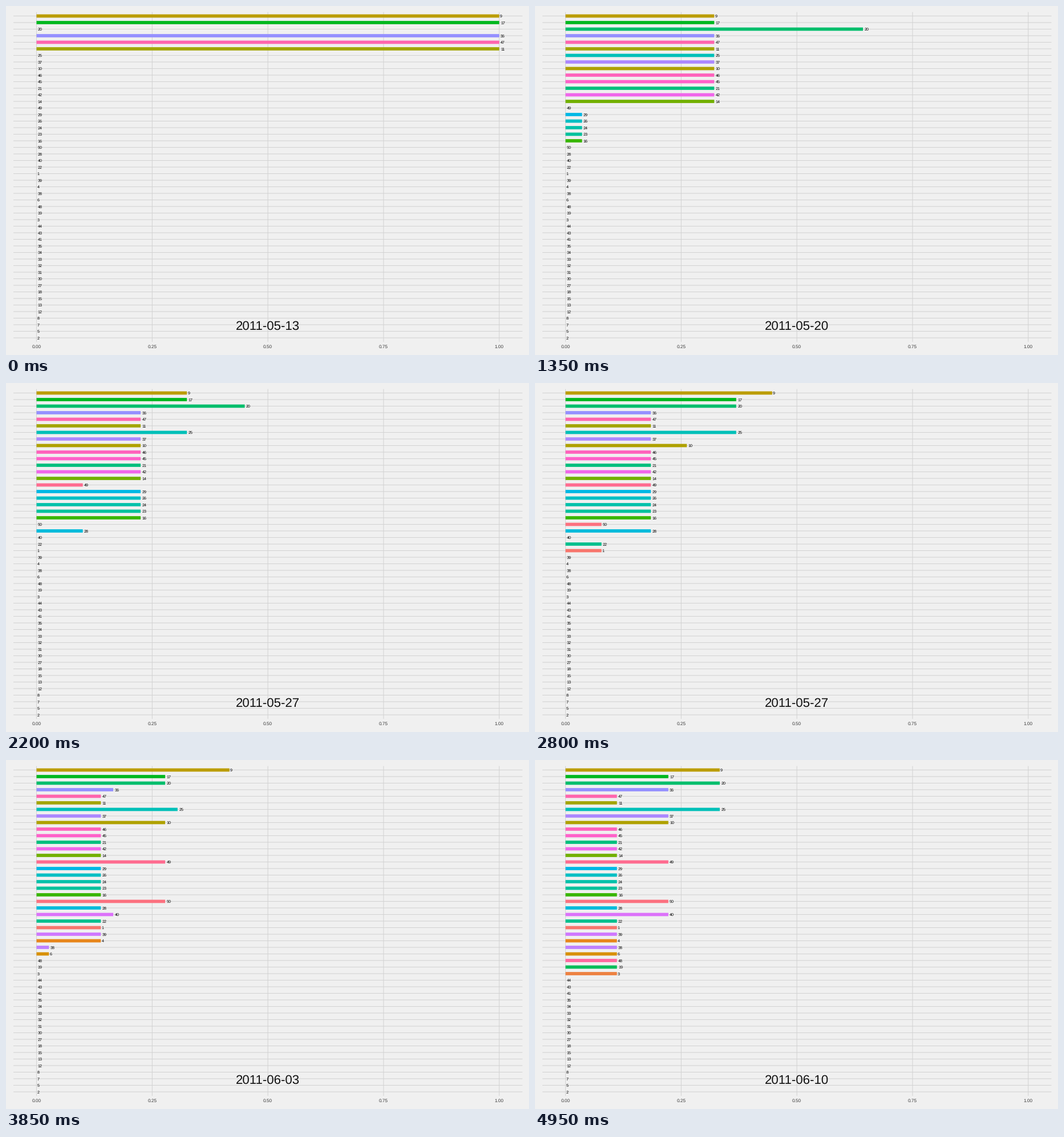
Animation, 917 px wide and 611 px high, one loop 5000 ms. Source, as a matplotlib script:

```python
import math

import matplotlib.pyplot as plt
import numpy as np
from matplotlib.animation import FuncAnimation

W, H, DPI = 917, 611, 64
FRAMES = 100
IDS = range(1, 51)

# The five ids that come up on each date; everything else follows from these.
DRAWS = [
    (9, 11, 17, 36, 47), (20, 21, 37, 45, 46), (10, 14, 20, 25, 42),
    (16, 23, 24, 26, 29), (9, 17, 25, 28, 49), (1, 9, 10, 22, 50),
    (4, 39, 40, 49, 50), (6, 25, 36, 38, 40), (3, 19, 20, 37, 48),
]

# Dates fall on Fridays and Tuesdays, so the gaps alternate between 4 and 3 days.
DAYS = [(7 * i + 1) // 2 for i in range(len(DRAWS))]
KEYS = [math.ceil(d / DAYS[-1] * (FRAMES - 1) - 0.5) for d in DAYS]

plt.rcParams["font.family"] = "Liberation Sans"
plt.rcParams["text.hinting"] = "no_hinting"


def points(px):
    return px * 72 / DPI


def x_at(share):
    return 53.5 + 811.3 * share


def y_at(row):
    return 17.5 + 11.5 * row


def hue_color(hue, chroma=100, light=65):
    """Polar LUV colour as sRGB, clipped to gamut."""
    a = math.radians(hue)
    y = ((light + 16) / 116) ** 3
    u = chroma * math.cos(a) / (13 * light) + 0.1978398
    v = chroma * math.sin(a) / (13 * light) + 0.4683363
    x = 9 * y * u / (4 * v)
    z = -x / 3 - 5 * y + 3 * y / v
    lin = np.array([
        3.240479 * x - 1.537150 * y - 0.498535 * z,
        -0.969256 * x + 1.875992 * y + 0.041556 * z,
        0.055648 * x - 0.204043 * y + 1.057311 * z,
    ]).clip(0, 1)
    return np.where(lin > 0.00304, 1.055 * lin ** (1 / 2.4) - 0.055, 12.92 * lin).clip(0, 1)


def date_text(days):
    return str(np.datetime64("2011-05-13") + days)


def rank_ids():
    """Shares of dates per id, with ids sorted by total share, then downwards."""
    hits = np.array([[i in draw for i in IDS] for draw in DRAWS], float)
    shares = hits.cumsum(axis=0) / np.arange(1, len(DRAWS) + 1)[:, None]
    totals = shares.sum(axis=0).round(6)
    order = sorted(IDS, key=lambda i: (-totals[i - 1], -i))
    return order, shares[:, [i - 1 for i in order]]


order, shares = rank_ids()

fig = plt.figure(figsize=(W / DPI, H / DPI), dpi=DPI, facecolor="#F0F0F0")
ax = fig.add_axes([0, 0, 1, 1])
ax.set_xlim(0, W)
ax.set_ylim(H, 0)
ax.axis("off")


def add_text(x, y, text, px, color, ha="left"):
    return ax.text(x, y, text, size=points(px), color=color, ha=ha, va="baseline", zorder=3)


# Grid and axis
grid = dict(colors="#D2D2D2", linewidths=points(1), capstyle="butt", snap=False, zorder=1)
ticks = np.linspace(0, 1, 5)
ax.hlines([y_at(r) for r in range(len(order))], 13, 905.5, **grid)
ax.vlines(x_at(ticks), 10.6, 588, **grid)
for t in ticks:
    add_text(x_at(t), 599, f"{t:.2f}", 8.2, "#3C3C3C", ha="center")

# Bars and their labels
bars, labels = [], []
for row, ident in enumerate(order):
    y = y_at(row)
    color = hue_color(15 + 360 * (ident - 1) / len(IDS))
    bars.append(ax.add_patch(plt.Rectangle((x_at(0), y - 2.875), 0, 5.75, fc=color,
                                           lw=0, snap=False, zorder=2)))
    labels.append(add_text(0, y + 2.6, str(ident), 7.1, "black"))

date = add_text(459, 567, "", 22.3, "#111111", ha="center")


def draw(frame):
    k = min(np.searchsorted(KEYS, frame, side="right") - 1, len(KEYS) - 2)
    t = (frame - KEYS[k]) / (KEYS[k + 1] - KEYS[k])
    now = (1 - t) * shares[k] + t * shares[k + 1]
    for bar, label, share in zip(bars, labels, now):
        bar.set_width(x_at(share) - x_at(0))
        label.set_x(x_at(share) + 1.2 * len(label.get_text()))
    date.set_text(date_text(DAYS[k + (t >= 0.5)]))
    return bars + labels + [date]


anim = FuncAnimation(fig, draw, frames=FRAMES, interval=50, repeat=True)
plt.show()
```
